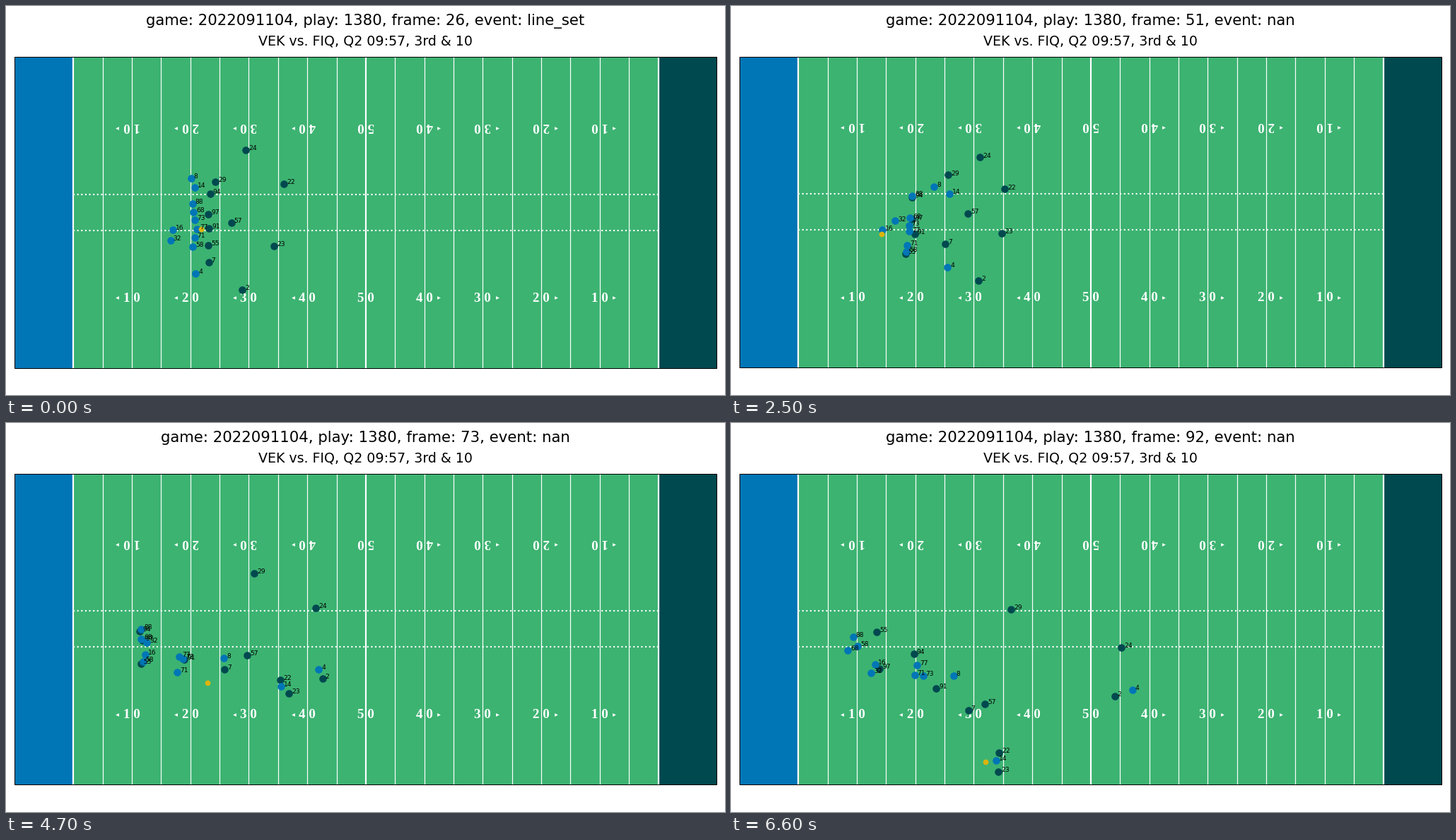
Recreate the animation shown at these times as a matplotlib script. Size 1017x551 px, loop 6.7 s.

```python
import numpy as np
import matplotlib.pyplot as plt
from matplotlib.animation import FuncAnimation
from matplotlib.patches import Rectangle

W, H, DPI = 1017, 551, 72          # at 72 dpi one point is one pixel
FRAMES, INTERVAL, FIRST = 67, 100, 26
BLUE, DARK, GRASS, GOLD = "#0076b6", "#00494f", "#3cb371", "#dbb40c"

# Field geometry in pixels
LEFT, TOP, YARD = 12.45, 71.6, 8.274
WIDTH, HEIGHT = 120 * YARD, 440.7
RIGHT, BOTTOM, MIDDLE = LEFT + WIDTH, TOP + HEIGHT, TOP + HEIGHT / 2

# Moments of the play, in frames
SNAP, ENGAGE, DROP, THROW, CROSS, CATCH, END = 12, 26, 32, 42, 47, 53, 66
EVENTS = {0: "line_set", SNAP - 1: "ball_snap", THROW: "pass_forward",
          CATCH: "pass_arrived", CATCH + 1: "pass_outcome_caught",
          CATCH + 4: "first_contact"}

plt.rcParams["font.family"] = "DejaVu Sans"
fig = plt.figure(figsize=(W / DPI, H / DPI), dpi=DPI, facecolor="white")
ax = fig.add_axes([0, 0, 1, 1])
ax.set_xlim(0, W)
ax.axis("off")
n = np.arange(FRAMES)


def yard_x(yards):
    return LEFT + yards * YARD


def draw_field():
    def block(x0, x1, color):
        ax.add_patch(Rectangle((x0, TOP), x1 - x0, HEIGHT, fc=color, lw=0, zorder=1))

    block(LEFT, RIGHT, GRASS)
    block(LEFT, yard_x(10), BLUE)
    block(yard_x(110), RIGHT, DARK)
    for yards in range(10, 111, 5):
        x = yard_x(yards)
        ax.plot([x, x], [TOP, BOTTOM], color="white", zorder=2, solid_capstyle="butt",
                lw=2.2 if yards % 50 == 10 else 1.2)
    for hash_yards in (23.58, 29.75):
        y = BOTTOM - hash_yards * HEIGHT / 53.3
        ax.plot([yard_x(10), yard_x(110)], [y, y], ":", color="white", lw=2.12, zorder=2)
    for yards in range(20, 101, 10):
        draw_number(yards)
    ax.add_patch(Rectangle((LEFT, TOP), WIDTH, HEIGHT, fill=False, ec="black",
                           lw=1, zorder=3))


def draw_number(yards):
    x = yard_x(yards)
    digits = " ".join(str(50 - abs(yards - 60)))
    side = np.sign(yards - 60)
    for half, angle in ((1, 0), (-1, 180)):
        ax.text(x, MIDDLE + 122 * half, digits, family="Liberation Serif",
                weight="bold", size=19, color="white", ha="center", va="center",
                rotation=angle, zorder=3)
        if side:
            ax.plot(x + side * 20.5, MIDDLE + 120.3 * half + 0.5, color="white",
                    marker=">" if side > 0 else "<", ms=4.8, mew=0, zorder=3)


def ramp(start, end):
    """Column rising from 0 to 1 between two frames."""
    return np.clip((n - start) / (end - start), 0, 1)[:, None]


def run(start, *points):
    """Wait for the snap, then run smoothly through the points."""
    times = (SNAP, DROP, END) if len(points) == 2 else (SNAP, DROP, CROSS, END)
    t, p = np.array(times, float), np.array([start, *points], float)
    slope = np.gradient(p, t, axis=0)
    slope[0] = 0
    now = np.maximum(n, SNAP)
    i = np.clip(np.searchsorted(t, now, "right") - 1, 0, len(t) - 2)
    h = (t[i + 1] - t[i])[:, None]
    s = (now - t[i])[:, None] / h
    return (p[i] + (p[i + 1] - p[i]) * s * s * (3 - 2 * s)
            + h * s * (1 - s) * (slope[i] * (1 - s) - slope[i + 1] * s))


def follow(partner, engage, start, close, part):
    """Close the gap to a partner, stay with him, then drift apart."""
    start, close, part = map(np.array, (start, close, part))
    return (partner + start + (close - start) * ramp(SNAP, engage)
            + (part - close) * ramp(CROSS, END))


draw_field()

offence = {
    # Passer, back and receivers
    16: run((235.5, 316), (201, 319.5), (203.5, 341.5)),
    32: run((232.5, 331.5), (227, 293), (199, 311), (198, 354)),
    8: run((261.5, 243), (301.5, 273), (308, 333), (314.5, 358)),
    14: run((267, 256.5), (339, 286), (389, 372.5), (375, 478)),
    4: run((268, 378.5), (343.5, 363), (442, 349), (567.5, 378)),
    # Blockers on the edges, then inside
    88: run((263.5, 279), (243.5, 267.5), (191, 292), (172.5, 302.5)),
    68: run((265, 291.5), (238.5, 305), (191, 306), (165, 322)),
    58: run((264, 340), (232.5, 350), (193.5, 337.5), (179, 315.5)),
    73: run((266.5, 302.5), (244, 317.5), (271.5, 357.5)),
    77: run((270, 315.5), (242, 322.5), (263, 342.5)),
    71: run((266.5, 327.5), (239, 346), (259.5, 357)),
}
defence = {
    # Rushers meet a blocker
    94: follow(offence[88], ENGAGE, (25, -13.5), (-2, 3), (86, 24)),
    97: follow(offence[68], ENGAGE, (21, 2.5), (2, 2), (45, 26)),
    91: follow(offence[77], ENGAGE, (17, -1), (7, 4), (27, 33.5)),
    55: follow(offence[58], ENGAGE, (22, -2), (-3, 3), (27, -20)),
    # Coverage closes in on a receiver
    22: follow(offence[14], CROSS, (126, -5.5), (-1, -8.5), (4, -11.5)),
    23: follow(offence[14], CROSS, (112, 82.5), (11, 10.5), (3, 16)),
    2: follow(offence[4], CROSS, (66, 22.5), (5.5, 12.5), (-25, 9)),
    7: follow(offence[8], CROSS, (25, 119.5), (1, 15.5), (21, 48.5)),
    57: follow(offence[8], CROSS, (57, 63), (33, -4), (44.5, 40)),
    # Deep zone
    24: run((339, 203), (369, 226), (552, 318)),
    29: run((296, 248), (318.5, 231.5), (351, 213), (396, 264)),
}


def ball_path():
    spot = np.array([276, 315])
    hand = offence[16] + np.array([-1, 8]) * ramp(SNAP, DROP)
    held = spot + (hand - spot) * ramp(SNAP, SNAP + 6)
    flight = held + (offence[14][CATCH] - held) * ramp(THROW, CATCH)
    carried = offence[14] + np.array([-15, 1.5]) * ramp(CATCH + 2, END)
    return np.where(n[:, None] < CATCH, flight, carried)


def dots(paths, color, diameter, zorder):
    tracks = np.stack(list(paths), axis=1)
    artist = ax.scatter(*tracks[0].T, s=diameter ** 2, c=color, linewidths=0,
                        zorder=zorder)
    return artist, tracks


layers = [dots(defence.values(), DARK, 10.6, 5), dots(offence.values(), BLUE, 10.6, 6),
          dots([ball_path()], GOLD, 7.8, 7)]
labels = [(ax.text(0, 0, str(number), size=9.1, color="black", zorder=8), path)
          for number, path in {**offence, **defence}.items()]

title = fig.text(508 / W, 0.98, "", size=21.24, ha="center", va="top")
fig.text(0.5, 1 - 56 / H, "VEK vs. FIQ, Q2 09:57, 3rd & 10", size=19.05,
         ha="center", va="baseline")


def update(frame):
    event = EVENTS.get(frame, "nan")
    title.set_text(f"game: 2022091104, play: 1380, frame: {FIRST + frame}, event: {event}")
    # An underscore makes the title taller and nudges the field down
    shift = 0.5 if "_" in event else 0
    ax.set_ylim(H - shift, -shift)
    for artist, tracks in layers:
        artist.set_offsets(tracks[frame])
    for label, path in labels:
        x, y = path[frame]
        label.set_position((x + YARD / 2, y + 0.3))
    return []


anim = FuncAnimation(fig, update, frames=FRAMES, interval=INTERVAL,
                     repeat=True, repeat_delay=0, blit=False)
plt.show()
```
